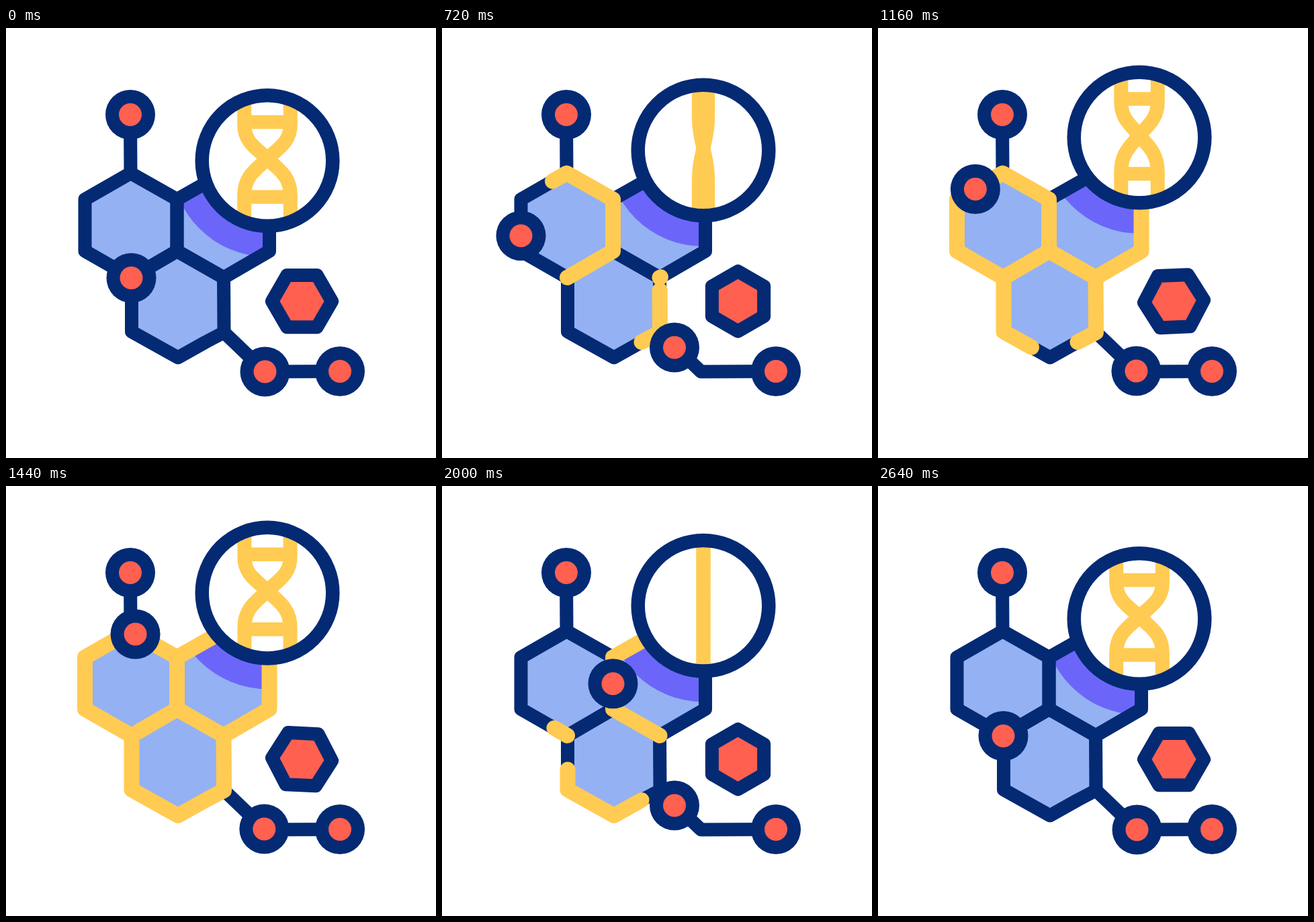
An HTML page with a canvas that plays this animation: 640x640 px, repeating every 2800 ms.

```html
<!DOCTYPE html>
<html lang="en">
<head>
<meta charset="utf-8">
<title>Molecule and DNA</title>
<style>
  html, body { margin: 0; height: 100%; overflow: hidden; background: #fff; }
  canvas { display: block; }
</style>
</head>
<body>
<canvas id="stage" width="640" height="640"></canvas>
<script>
const ctx = document.getElementById('stage').getContext('2d');
const NAVY = '#042a74', BLUE = '#94b1f3', PURPLE = '#6b66f9', YELLOW = '#ffcb52', RED = '#ff6050';
const LOOP = 2800, START = 200;

// Hexagon outlines, each listed counter-clockwise from where its highlight starts
const hexLeft = [[186.5, 371.5], [254.5, 332], [254.5, 255], [185.5, 216], [117.5, 255], [117.5, 332]];
const hexRight = [[324, 371.5], [392, 332], [392, 255], [323.5, 216], [254.5, 255], [254.5, 332]];
const hexBottom = [[297, 467.5], [324.5, 453], [324, 371.5], [254.5, 332], [187, 371.5], [187, 452], [256, 490.5]];

const clamp = u => Math.min(1, Math.max(0, u));
const mix = (a, b, s) => a + (b - a) * s;
const ramp = (t, from, duration) => {
  const u = clamp((t - from) / duration);
  return u * u * (3 - 2 * u);
};
const easeIn = u => u * u * (1.8 - 0.8 * u);

function trace(points, closed) {
  ctx.beginPath();
  points.forEach(p => ctx.lineTo(...p));
  if (closed) ctx.closePath();
}

function stroke(color, width) {
  ctx.strokeStyle = color;
  ctx.lineWidth = width;
  ctx.stroke();
}

function fill(color) {
  ctx.fillStyle = color;
  ctx.fill();
}

function disc(x, y, r, color) {
  ctx.beginPath();
  ctx.arc(x, y, r, 0, 2 * Math.PI);
  fill(color);
}

function ball(x, y) {
  disc(x, y, 37, NAVY);
  disc(x, y, 17, RED);
}

// Yellow line that runs round the outline, then is wiped from its beginning
function highlight(points, t, from) {
  const path = [...points, points[0]];
  const length = path.slice(1).reduce(
    (sum, [x, y], i) => sum + Math.hypot(x - path[i][0], y - path[i][1]), 0);
  const head = ramp(t, from, 960), tail = ramp(t, from + 960, 960);
  if (head <= 0 || tail >= 1) return;
  trace(path);
  ctx.setLineDash([(head - tail) * length, 2 * length]);
  ctx.lineDashOffset = -tail * length;
  stroke(YELLOW, 23);
  ctx.setLineDash([]);
}

function molecule(t, lensY) {
  for (const hex of [hexLeft, hexRight, hexBottom]) {
    trace(hex, true);
    fill(BLUE);
  }
  ctx.save();
  trace(hexRight, true);
  ctx.clip();
  disc(389, lensY, 143, PURPLE);
  ctx.restore();

  trace([[185, 129], [185.5, 216]]);
  stroke(NAVY, 20);
  trace([[324.5, 453], [385.5, 511.5], [497, 511]]);
  stroke(NAVY, 20);
  for (const hex of [hexLeft, hexRight, hexBottom]) {
    trace(hex, true);
    stroke(NAVY, 20);
  }
  highlight(hexLeft, t, 208);
  highlight(hexBottom, t, 448);
  highlight(hexRight, t, 688);
}

// Visits the corners of the left hexagon clockwise, 400 ms per side
function orbitingBall(t) {
  const p = 6 * clamp((t - START) / 2400);
  const side = Math.min(5, Math.floor(p));
  let u = p - side;
  if (side === 0) u = easeIn(u);
  if (side === 5) u = 1 - easeIn(1 - u);
  const a = hexLeft[(6 - side) % 6], b = hexLeft[5 - side];
  ball(mix(a[0], b[0], u), mix(a[1], b[1], u) + 0.5);
}

function slidingBall(t) {
  const s = ramp(t, 200, 400) - ramp(t, 800, 400) + ramp(t, 1400, 400) - ramp(t, 2000, 400);
  ball(385.5 - 39.5 * s, 511.5 - 36 * s);
}

function spinningHexagon(t) {
  const quarters = [200, 800, 1400, 2000].reduce((sum, from) => sum + ramp(t, from, 400), 0);
  const corners = Array.from({ length: 6 }, (_, i) => {
    const angle = quarters * Math.PI / 2 + i * Math.PI / 3;
    return [440.5 + 44.6 * Math.cos(angle), 406.7 + 44.6 * Math.sin(angle)];
  });
  trace(corners, true);
  fill(RED);
  stroke(NAVY, 20);
}

function lens(t, y) {
  const half = 34.3 * (1 - 2 * ramp(t, 200, 1200) + 2 * ramp(t, 1400, 1200));
  ctx.save();
  ctx.translate(389, y);
  disc(0, 0, 97.5, '#fff');
  ctx.save();
  ctx.clip();
  for (const w of [half, -half]) {
    ctx.beginPath();
    ctx.moveTo(-w, -100);
    ctx.lineTo(-w, -53);
    ctx.bezierCurveTo(-w, -27, -0.44 * w, -18, 0, -3);
    ctx.bezierCurveTo(0.44 * w, 12, w, 22, w, 51);
    ctx.lineTo(w, 100);
    stroke(YELLOW, 21);
  }
  for (const rung of [-57.5, 54]) {
    trace([[-half, rung], [half, rung]]);
    stroke(YELLOW, 20.5);
  }
  ctx.restore();
  ctx.beginPath();
  ctx.arc(0, 0, 97.3, 0, 2 * Math.PI);
  stroke(NAVY, 20.5);
  ctx.restore();
}

function draw(now) {
  const t = now % LOOP;
  const lensY = 197.5 - 38.5 * (ramp(t, 200, 1200) - ramp(t, 1400, 1200));
  ctx.fillStyle = '#fff';
  ctx.fillRect(0, 0, 640, 640);
  ctx.lineCap = ctx.lineJoin = 'round';
  molecule(t, lensY);
  ball(185, 129);
  ball(497, 511);
  orbitingBall(t);
  slidingBall(t);
  spinningHexagon(t);
  lens(t, lensY);
}

const begin = performance.now();
function tick() {
  draw(performance.now() - begin);
  requestAnimationFrame(tick);
}
tick();
</script>
</body>
</html>
```
